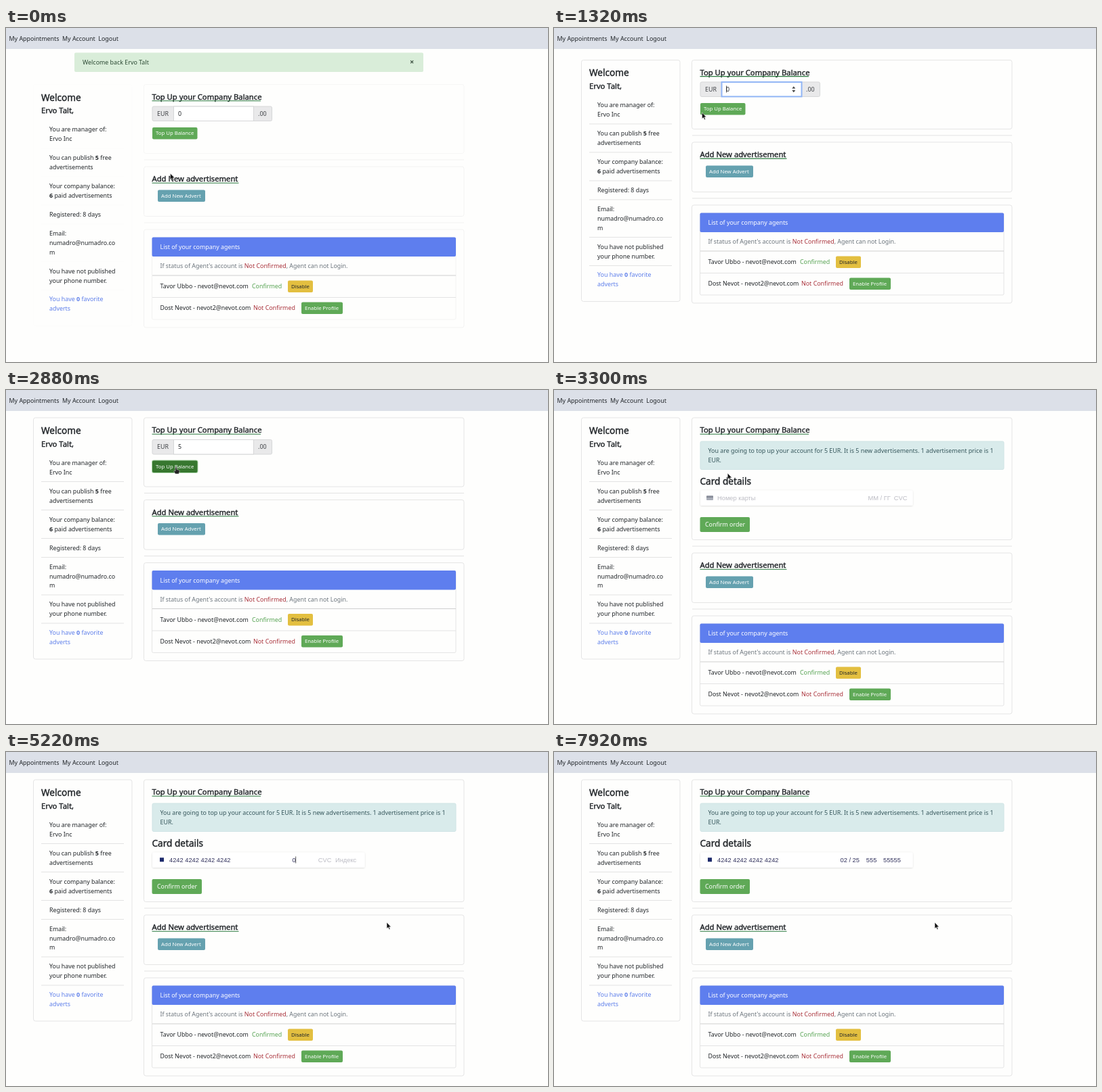
Animation, 800 px wide and 494 px high, one loop 8 s. Source, as an HTML page:

```html
<!DOCTYPE html>
<html lang="en">
<head>
<meta charset="utf-8">
<title>Company balance</title>
<style>
html, body { margin: 0; width: 100%; height: 100%; overflow: hidden; background: #fefefd; }
svg { display: block; width: 800px; height: 494px; }
text { font: 8.9px "Noto Sans", "Open Sans", sans-serif; fill: #212529; white-space: pre; }
.h4 { font-size: 13.6px; stroke: #212529; stroke-width: .4px; }
.h5 { font-size: 11.25px; stroke: #212529; stroke-width: .4px; }
.small { font-size: 7.75px; }
.white { fill: #fff; }
.muted { fill: #6c757d; }
.red { fill: #a9323b; }
.green { fill: #57a353; }
.blue { fill: #5d7eea; }
.bold { font-weight: 700; }
.card { fill: none; stroke: #e5e5e5; }
.stripe text { font: 9.3px "Liberation Sans", Arial, sans-serif; fill: #32325d; }
.stripe .hint { fill: #bcbcc4; }
</style>
</head>
<body>
<svg id="stage" viewBox="0 0 800 494" xmlns="http://www.w3.org/2000/svg"></svg>
<script>
const LOOP = 8000;
const ALERT_SHIFT = 42.5, CHECKOUT_SHIFT = 78.5;

const text = (x, y, s, cls = "", extra = "") => `<text x="${x}" y="${y}" class="${cls}" ${extra}>${s}</text>`;
const span = (s, cls) => `<tspan class="${cls}">${s}</tspan>`;
const rect = (x, y, w, h, attrs, r = 2) => `<rect x="${x}" y="${y}" width="${w}" height="${h}" rx="${r}" ${attrs}/>`;
const card = (x, y, w, h, id = "") => rect(x, y, w, h, `class="card" ${id && `id="${id}"`}`, 3);
const rule = (x1, x2, y, color = "#e3e3e3") => `<path d="M${x1} ${y}H${x2}" stroke="${color}"/>`;
const group = (id, content, attrs = "") => `<g id="${id}" ${attrs}>${content}</g>`;
const button = (x, y, w, h, label, fill, cls = "small white", pad = 5) =>
  rect(x, y, w, h, `fill="${fill}"`) + text(x + pad, y + h / 2 + 2.6, label, cls);
const heading = (y, s, width) => text(215.5, y, s, "h5") +
  `<path d="M215.5 ${y + 2}h${width}" stroke="#2b7a40" stroke-width="1.1"/>`;

const sidebarLines = [
  [110.6, "You are manager of:"], [124.5, "Ervo Inc"],
  [152.6, `You can publish ${span("5", "bold")} free`], [166.5, "advertisements"],
  [194.5, "Your company balance:"], [208.5, `${span("6", "bold")} paid advertisements`],
  [236.5, "Registered: 8 days"],
  [264.5, "Email:"], [278.5, "numadro@numadro.co"], [292.3, "m"],
  [320.4, "You have not published"], [334.3, "your phone number."],
  [361.8, `You have ${span("0", "bold")} favorite`, "blue"], [375.8, "adverts", "blue"]
];
const sidebar =
  group("sideLines", card(40.5, 41, 145.5, 357) +
    [135.5, 177.5, 219.5, 247.5, 303, 345].map(y => rule(52, 174, y)).join("")) +
  text(52, 65, "Welcome", "h4") + text(52, 83.8, "Ervo Talt,", "h5") +
  sidebarLines.map(([y, s, cls]) => text(64, y, s, cls)).join("");

const amountForm =
  rect(216, 73.5, 176.5, 21.5, 'fill="#e9e9ea" stroke="#d6d7d8"') +
  rect(247.5, 73.5, 118, 21.5, 'id="field" fill="#fff" stroke="#d6d7d8"', 0) +
  text(223, 87.3, "EUR", "", 'fill-opacity=".85"') + text(372, 87.3, ".00", "", 'fill-opacity=".85"') +
  text(254, 87.3, "0", "", 'id="amount"') +
  `<path id="amountCaret" d="M254.5 79v10" stroke="#222" stroke-width=".8"/>` +
  `<path id="spinner" d="M351.3 83l2.5-3.2 2.5 3.2zM351.3 85.5l2.5 3.2 2.5-3.2z" fill="#444"/>` +
  rect(215, 103.5, 68.5, 19.5, 'id="ring" fill="#a9d3a7"', 3) +
  rect(216, 104.5, 66.5, 17.5, 'id="topUp"') + text(221, 115.8, "Top Up Balance", "small white");

const savedCard = group("savedCard",
  rect(243, 167, 175.5, 65, 'fill="#fff" filter="url(#shadow)"') +
  rect(243, 209, 175.5, 23, 'fill="#f0f1f2"') +
  `<circle cx="258.5" cy="188" r="4.5" fill="#e08a2c"/>` +
  text(275, 184.3, "Vornelcard  •••• 7709", "bold", 'style="font-size:8.5px;fill:#444"') +
  text(275, 197.3, "Expires on 05/23", "small", 'style="fill:#444"') +
  text(250, 223.3, "Manage payment methods…", "", 'style="fill:#444"') +
  `<circle cx="394" cy="219" r="3" fill="#5d86e0"/>` + text(399, 222, "Zil", "small muted"));

const cardField = rect(216, 148.5, 313.5, 22.5, 'fill="#fff" filter="url(#shadow)"') +
  group("blankCard", rect(225, 156, 10, 7, 'fill="#a9adb8"', 1) + rect(225, 157.5, 10, 1.3, 'fill="#747986"', 0)) +
  rect(227, 156.3, 6, 6, 'id="brand" fill="#1d2a6b"', 0) +
  `<g class="stripe">` + text(241, 163, "", "", 'id="number"') +
  `<g clip-path="url(#fieldClip)">` + group("details",
    text(422.5, 163, "", "", 'id="expiry"') + text(460.8, 163, "", "", 'id="cvc"') +
    text(486, 163, "", "", 'id="zip"')) + `</g></g>` +
  `<path id="cardCaret" d="M0 154.5v10" stroke="#333" stroke-width=".8"/>`;

const checkout =
  rect(216, 76, 448, 41.5, 'fill="#d9ebeb" stroke="#cfe4e5"') +
  text(227.5, 93.3, "You are going to top up your account for 5 EUR. It is 5 new advertisements. 1 advertisement price is 1", "", 'style="fill:#35565b"') +
  text(227.5, 107, "EUR.", "", 'style="fill:#35565b"') +
  text(215.5, 139.7, "Card details", "h4") + cardField +
  button(215.5, 188, 73.5, 22, "Confirm order", "#5fa957", "white", 7.5) + savedCard;

const lower =
  group("lowerLines", rule(204, 676, 152.5) + card(203.5, 162.5, 472.5, 73.5) +
    rule(204, 676, 245.5) + card(203.5, 255.5, 472.5, 145) +
    rect(215.5, 267.5, 448.5, 121, 'class="card"')) +
  heading(184.7, "Add New advertisement", 128) +
  button(224, 197, 70, 17.5, "Add New Advert", "#65a1af") +
  rect(215.5, 267, 448.5, 28.5, 'fill="#5e7eee"') + text(227.5, 284.5, "List of your company agents", "white") +
  text(227.5, 312.7, `If status of Agent's account is ${span("Not Confirmed", "red")}, Agent can not Login.`, "muted") +
  rule(216, 664, 323.5, "#cfcfcf") +
  text(227.5, 342.5, "Tavor Ubbo - nevot@nevot.com") + text(363, 342.5, "Confirmed", "green") +
  button(416, 331, 37, 17.5, "Disable", "#e3bf40", "small") +
  rule(216, 664, 356) +
  text(227.5, 374.5, "Dost Nevot - nevot2@nevot.com") + text(365, 374.5, "Not Confirmed", "red") +
  button(436, 363, 61, 17.5, "Enable Profile", "#5fa957");

const pointers =
  group("arrow", `<path d="M0 0V9.2L2.1 7.3 3.6 10.6 5 10 3.6 6.8H6.3Z" fill="#111" stroke="#fff" stroke-width=".5"/>`) +
  group("beam", `<path d="M-2.5-4.5Q0-4.5 0-3.5Q0-4.5 2.5-4.5M0-3.5V3.5M-2.5 4.5Q0 4.5 0 3.5Q0 4.5 2.5 4.5" fill="none" stroke="#222"/>`) +
  group("hand", `<path d="M-1 0Q0-1 1 0V3.5L4.5 4.5Q5.5 5 5 7L4 10H-1L-3.5 6Q-3 4.5-1 6Z" fill="#222" stroke="#ddd" stroke-width=".5"/>`);

document.getElementById("stage").innerHTML = `
  <defs>
    <filter id="shadow" x="-10%" y="-20%" width="120%" height="150%">
      <feDropShadow dx="0" dy=".6" stdDeviation="1" flood-color="#000" flood-opacity=".16"/>
    </filter>
    <clipPath id="fieldClip"><rect x="340" y="149" width="183.5" height="22"/></clipPath>
  </defs>
  <rect width="800" height="494" fill="#fefefd"/>` +
  group("page", sidebar + card(203.5, 41, 472.5, 102, "balanceCard") +
    heading(63.2, "Top Up your Company Balance", 160.5) +
    group("amountForm", amountForm) + group("lower", lower) + group("checkout", checkout)) +
  group("alert", rect(101, 36.5, 515, 28.5, 'fill="#d9edd9"') +
    text(113, 53.5, "Welcome back Ervo Talt", "", 'style="fill:#2c4a34"') +
    text(596, 54.3, "×", "bold", 'style="font-size:11px;fill:#3b5040"')) +
  rect(0, 0, 800, 31, 'fill="#dce0e8"', 0) +
  text(4.5, 18.6, "My Appointments") + text(83, 18.6, "My Account") + text(136.3, 18.6, "Logout") +
  group("pointer", pointers);

const el = {};
document.querySelectorAll("[id]").forEach(node => el[node.id] = node);

const clamp = v => Math.max(0, Math.min(1, v));
const ramp = (t, from, to) => clamp((t - from) / (to - from));
const ease = v => v * v * (3 - 2 * v);
const within = (t, from, to) => t >= from && t < to;
const show = (node, on) => node.setAttribute("visibility", on ? "inherit" : "hidden");
const fade = (node, v) => node.setAttribute("opacity", v);
const move = (node, x, y) => node.setAttribute("transform", `translate(${x} ${y})`);

const pointerPath = [
  [480, 242.5, 215], [840, 278, 117], [1080, 252, 122], [1500, 197, 127],
  [2340, 197, 127], [2700, 251, 114], [3180, 251, 114], [3600, 277, 159],
  [4320, 277, 159], [4620, 562, 252]
];
function pointerAt(t) {
  const i = pointerPath.findIndex(p => p[0] > t);
  if (i === 0) return pointerPath[0].slice(1);
  if (i < 0) return pointerPath[pointerPath.length - 1].slice(1);
  const [t0, x0, y0] = pointerPath[i - 1], [t1, x1, y1] = pointerPath[i];
  const k = ease(ramp(t, t0, t1));
  return [x0 + (x1 - x0) * k, y0 + (y1 - y0) * k];
}

// Types each chunk in turn, one per step.
const typed = (t, start, step, chunks) =>
  chunks.slice(0, Math.max(0, Math.floor((t - start) / step) + 1)).join("");
function setInput(node, value, hint) {
  node.textContent = value || hint;
  node.setAttribute("class", value ? "" : "hint");
}

function drawCheckout(t) {
  const number = typed(t, 4020, 60, ["4242", " 4242", " 4242", " 4242"]);
  const expiry = typed(t, 5220, 120, ["0", "2 / ", "2", "5"]);
  const cvc = typed(t, 5700, 120, ["5", "5", "5"]);
  const zip = typed(t, 6120, 120, ["5", "5", "5", "5", "5"]);
  setInput(el.number, number, "Номер карты");
  setInput(el.expiry, expiry, "ММ / ГГ");
  setInput(el.cvc, cvc, "CVC");
  setInput(el.zip, zip, "Индекс");
  const slide = 41 * (1 - ease(ramp(t, 4140, 4440)));
  move(el.details, slide, 0);
  show(el.zip, t >= 4140);

  const cvcActive = within(t, 5640, 6120);
  show(el.blankCard, t < 4140 || within(t, 5640, 5980));
  fade(el.brand, cvcActive ? 0 : t < 5640 ? ramp(t, 4140, 4440) : 1);
  fade(el.savedCard, ramp(t, 3780, 3840) * (1 - ramp(t, 4200, 4340)));

  let caretX = 241.5;
  if (t >= 6000) caretX = 486.5 + zip.length * 5.17;
  else if (t >= 5640) caretX = 461 + cvc.length * 5.17;
  else if (t >= 4230) caretX = 422.5 + slide + (expiry ? el.expiry.getComputedTextLength() : 0);
  else if (number) caretX = 241.5 + el.number.getComputedTextLength();
  move(el.cardCaret, caretX, 0);
  const blinkedOff = within(t, 4980, 5220) || within(t, 6840, 7200) || within(t, 7560, 7800);
  show(el.cardCaret, within(t, 3720, 7800) && !blinkedOff);
}

function draw(t) {
  const paying = t >= 3120;
  const shift = ALERT_SHIFT * (1 - ease(ramp(t, 1140, 1380)));
  move(el.page, 0, shift);
  move(el.alert, 0, shift - ALERT_SHIFT);
  fade(el.alert, 1 - ramp(t, 900, 1200));
  fade(el.sideLines, t < 480 ? .04 : 1);
  fade(el.lowerLines, t < 480 ? .45 : 1);
  fade(el.balanceCard, t < 480 ? .3 : 1);

  el.balanceCard.setAttribute("height", paying ? 180.5 : 102);
  move(el.lower, 0, paying ? CHECKOUT_SHIFT : 0);
  show(el.amountForm, !paying);
  show(el.checkout, paying);

  const focused = within(t, 1080, 2820);
  const pressed = within(t, 2820, 3120);
  el.amount.textContent = t < 1980 ? "0" : "5";
  el.field.setAttribute("stroke", focused ? "#91b5f5" : "#d6d7d8");
  el.field.setAttribute("stroke-width", focused ? 2 : 1);
  show(el.spinner, !paying && within(t, 720, 2820));
  show(el.amountCaret, !paying && within(t, 1080, 1980));
  show(el.ring, !paying && pressed);
  el.topUp.setAttribute("fill", pressed ? "#37772f" : "#5fa957");
  if (paying) drawCheckout(t);
  else {
    show(el.cardCaret, false);
    show(el.blankCard, false);
    show(el.zip, false);
  }

  move(el.pointer, ...pointerAt(t));
  const beam = within(t, 720, 1140) || within(t, 3480, 4350);
  const hand = within(t, 2580, 3180);
  show(el.beam, beam);
  show(el.hand, hand);
  show(el.arrow, !beam && !hand);
}

const start = performance.now();
function tick() {
  draw((performance.now() - start) % LOOP);
  requestAnimationFrame(tick);
}
tick();
</script>
</body>
</html>
```
